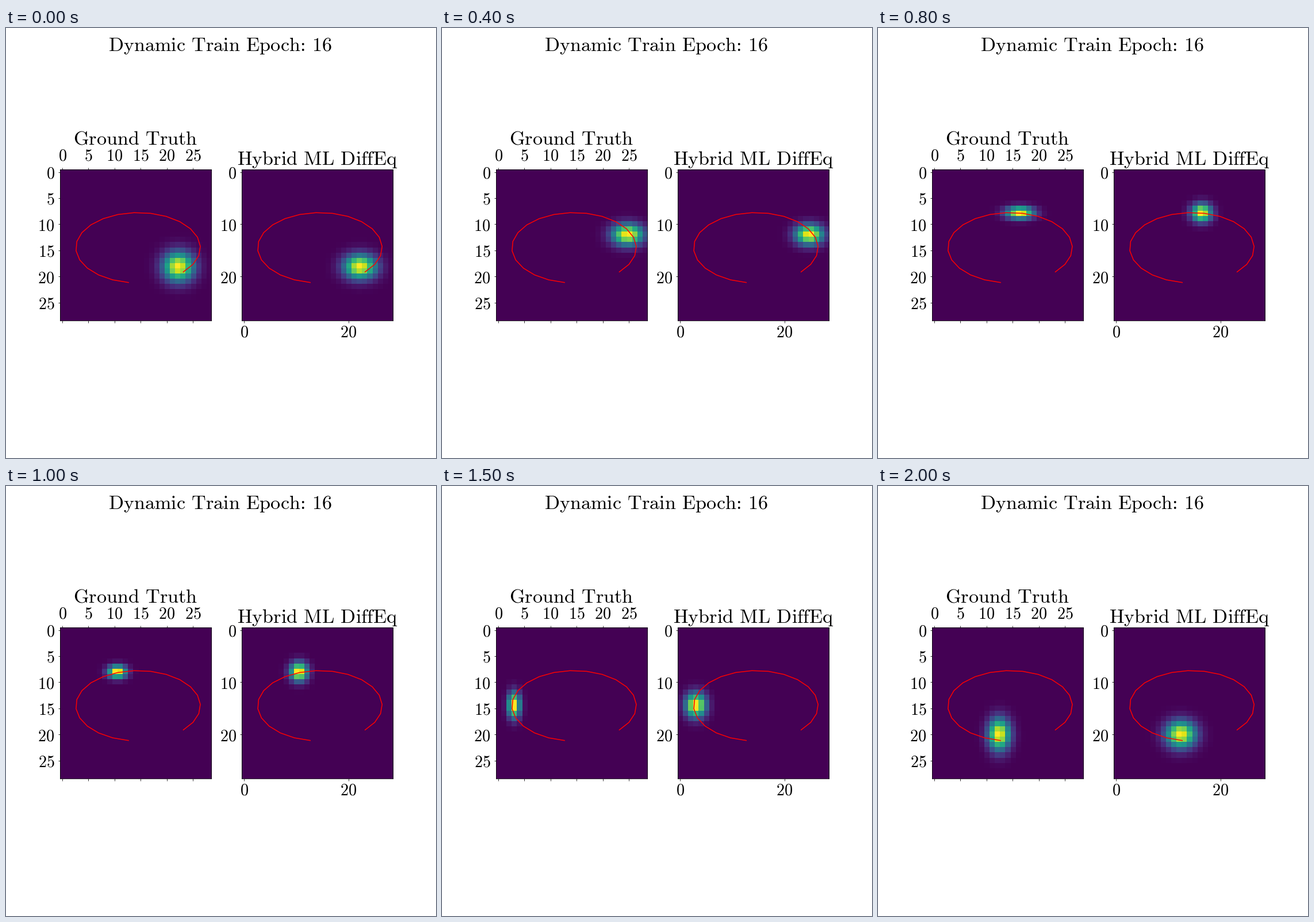
Animation, 748 px wide and 748 px high, one loop 2100 ms. Source, as a matplotlib script:

```python
import numpy as np
import matplotlib.pyplot as plt
from matplotlib.animation import FuncAnimation

plt.rcParams["mathtext.fontset"] = "cm"

N = 29          # grid cells per side
STEPS = 21      # positions along the orbit
TITLE, TICK = 34.2, 28.2


def cm(text):
    """Upright Computer Modern with ordinary word spaces."""
    words = [r"\text{%s}" % w for w in text.split()]
    return "$" + r"\hspace{0.38}".join(words) + "$"


def angle(step):
    return np.radians(43.4 - 304.5 * step / (STEPS - 1))


def orbit(step):
    a = angle(step)
    return 14.5 + 11.92 * np.cos(a), 14.5 + 6.73 * np.sin(a)


def true_spread(step):
    """The spot widens to the right and grows taller towards the bottom."""
    x, y = orbit(step)
    return 1.4 + 0.65 * np.tanh((x - 12.5) / 6), np.sqrt(0.64 + 0.283 * (y - 7.9))


def model_spread(step):
    a = angle(step)
    return (1.62 + 0.5 * np.cos(a - np.radians(50)),
            1.47 + 0.3 * np.cos(a - np.radians(105)))


def blob(step, spread):
    """Gaussian spot, scaled to a peak of one, just inside the orbit."""
    x, y = orbit(step)
    sx, sy = spread(step)
    cells = np.arange(N)
    gx = np.exp(-0.5 * ((cells - 0.5 - 0.934 * x) / sx) ** 2)
    gy = np.exp(-0.5 * ((cells - 0.6 - 0.92 * y) / sy) ** 2)
    z = np.outer(gy, gx)
    return z / z.max()


def panel(ax, spread, title, pad, xticks, yticks):
    im = ax.imshow(blob(0, spread), cmap="viridis", vmin=0, vmax=1)
    ax.plot(*orbit(np.arange(STEPS)), color="red", lw=1.5)
    ax.set(xlim=(-0.5, N - 0.5), ylim=(N - 0.5, -0.5))
    ax.set_xticks(xticks, [cm(str(v)) for v in xticks])
    ax.set_yticks(yticks, [cm(str(v)) for v in yticks])
    ax.tick_params(labelsize=TICK)
    ax.tick_params(axis="x", pad=2.5)
    ax.tick_params(axis="y", pad=5.5)
    ax.set_title(cm(title), fontsize=TITLE, y=1.0, pad=pad)
    return im


fig, (left, right) = plt.subplots(1, 2, figsize=(10.389, 10.389), dpi=72)
fig.suptitle(cm("Dynamic Train Epoch: 16"), x=0.498, y=1 - 40 / 748,
             va="baseline", fontsize=TITLE)

fives, tens = range(0, N, 5), range(0, N, 10)
spots = [
    (panel(left, true_spread, "Ground Truth", 43, fives, fives), true_spread),
    (panel(right, model_spread, "Hybrid ML DiffEq", 7.5, [0, 20], tens), model_spread),
]
left.tick_params(axis="x", top=True, labeltop=True, labelbottom=False, pad=5.5)


def update(step):
    for im, spread in spots:
        im.set_data(blob(step, spread))
    return [im for im, _ in spots]


anim = FuncAnimation(fig, update, frames=STEPS, interval=100, repeat=True,
                     repeat_delay=0, blit=False)
plt.show()
```
